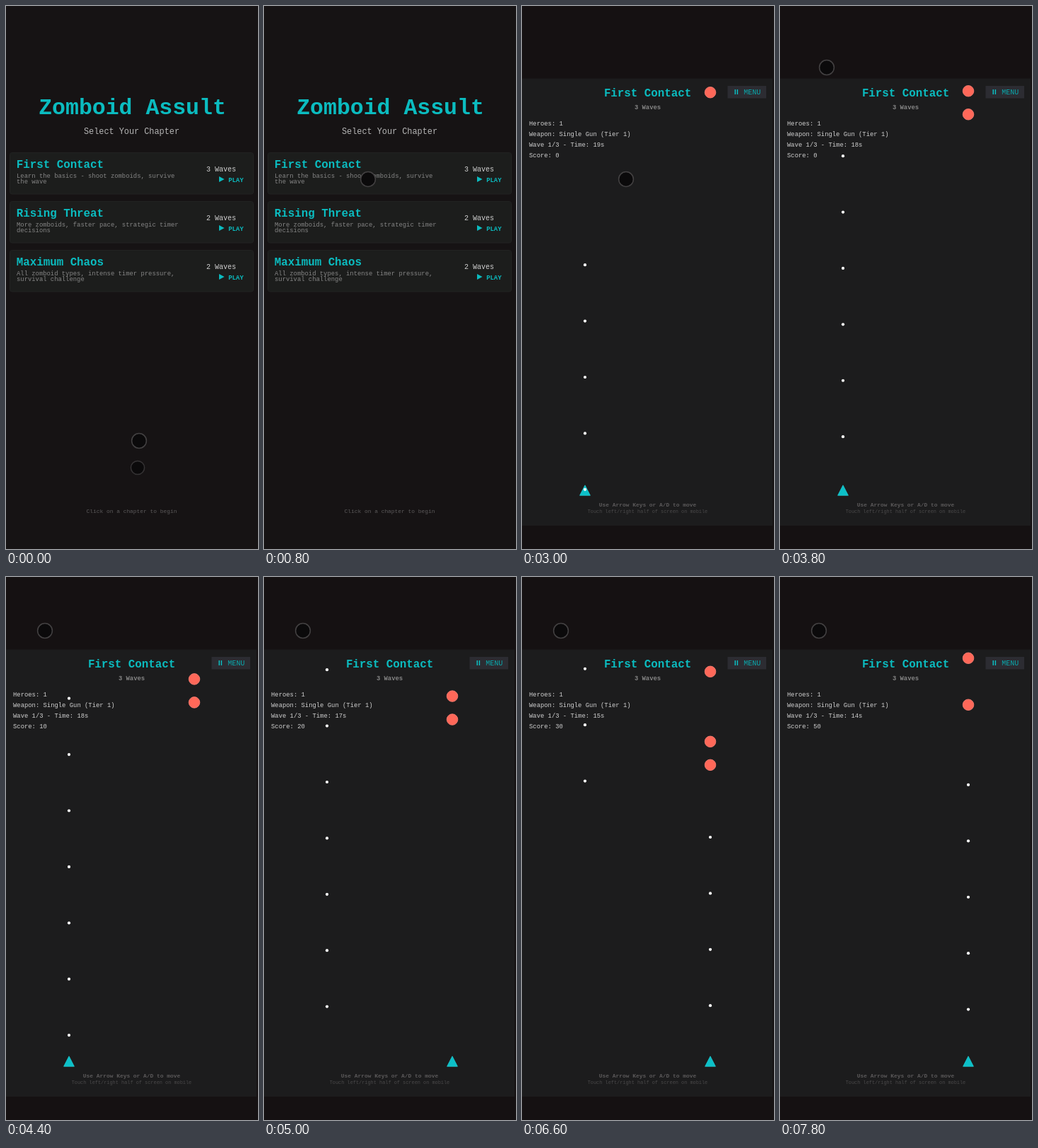
Animation, 356 px wide and 768 px high, one loop 8 s. Source, as an HTML page:

```html
<!DOCTYPE html>
<html lang="en">
<head>
<meta charset="utf-8">
<title>Zomboid Assult</title>
<style>
  html, body { margin: 0; height: 100%; overflow: hidden; background: #151112; }
  svg { display: block; width: 100vw; height: 100vh; }
  text { font-family: "Courier New", "Liberation Mono", monospace; font-size: 8.87px; fill: #d0d0d0; }
  .bold { font-weight: bold; }
  .teal { fill: #0bbcc0; }
  .mid { text-anchor: middle; }
  .end { text-anchor: end; }
  .dim { fill: #858585; }
  .faint { fill: #5c5a5b; }
  .big { font-size: 31.5px; }
  .head { font-size: 15.8px; }
  .label { font-size: 10px; }
  .note { font-size: 7.9px; }
  .card { fill: #1c1d1c; stroke: #222322; }
  .zomboid { fill: #ff6859; stroke: #ff8175; stroke-width: .8; }
  .bullet { fill: #fff; }
  .cursor { fill: #0b0a0b; stroke: #434142; stroke-width: 1.5; }
  #trail { stroke: #363435; }
</style>
</head>
<body>
<svg viewBox="0 0 356 768" preserveAspectRatio="none">
  <defs><clipPath id="field"><rect y="102" width="356" height="633"/></clipPath></defs>

  <g id="menu">
    <rect width="356" height="768" fill="#161314"/>
    <text class="mid bold teal big" x="178.5" y="153">Zomboid Assult</text>
    <text class="mid" x="177.5" y="180.5" style="font-size:11.85px;fill:#b5b5b5">Select Your Chapter</text>
    <g id="cards"></g>
    <text class="mid note faint" x="177.5" y="717">Click on a chapter to begin</text>
  </g>

  <g id="game">
    <rect width="356" height="768" fill="#151112"/>
    <rect y="102.5" width="354" height="632.5" fill="#1c1c1d"/>
    <text class="mid bold teal head" x="177.5" y="128">First Contact</text>
    <text class="mid bold dim" x="177.5" y="146">3 Waves</text>
    <rect x="290.5" y="113" width="54.5" height="17.5" fill="#2c2c32"/>
    <path class="teal" d="M300.5 118h1.5v7h-1.5zM303.6 118h1.5v7h-1.5z"/>
    <text class="label" x="313.3" y="125.3" style="fill:#0aa9ad">MENU</text>
    <text x="10" y="169">Heroes: 1</text>
    <text x="10" y="184">Weapon: Single Gun (Tier 1)</text>
    <text x="10" y="198.7" id="wave"></text>
    <text x="10" y="213.5" id="score"></text>
    <text class="mid bold note faint" x="177.5" y="707.5">Use Arrow Keys or A/D to move</text>
    <text class="mid" x="177.5" y="716.8" style="font-size:6.9px;fill:#4a494a">Touch left/right half of screen on mobile</text>
    <path id="hero" d="M0 677.8L7.4 692.2H-7.4z" fill="#0cc0c8" stroke="#1fcbd1" stroke-width=".8" stroke-linejoin="round"/>
    <g id="actors" clip-path="url(#field)"></g>
  </g>

  <circle id="trail" class="cursor" cx="186" cy="653" r="9.6"/>
  <circle id="cursor" class="cursor" r="10.4"/>
</svg>

<script>
const $ = id => document.getElementById(id);
const LOOP = 8000, STEP = 200, GAME_AT = 1600;
const LANES = [89, 266];
const START = 1394, FIRE_GAP = 400, BULLET_SPEED = 0.1985, MUZZLE = 685;
const SPAWN_AT = 2225, SPAWN_GAP = 825, WALK_SPEED = 0.04, SPAWN_Y = 91.2;
const LANE_CHANGE = 4700, HIT_GAP = 10;

// [time, game clock]: the game runs slightly unevenly
const CLOCK = [[1600, 1600], [3000, 3000], [3800, 3776], [5000, 4984], [6600, 6591], [7800, 7764]];
// [time, x, y]
const CURSOR = [[0, 188, 615], [400, 312, 240], [800, 147, 245], [3000, 147, 245],
  [3600, 66, 87], [3800, 66, 87], [4200, 55, 76]];

const CHAPTERS = [
  ["First Contact", 3, "Learn the basics - shoot zomboids, survive", "the wave"],
  ["Rising Threat", 2, "More zomboids, faster pace, strategic timer", "decisions"],
  ["Maximum Chaos", 2, "All zomboid types, intense timer pressure,", "survival challenge"],
];

$("cards").innerHTML = CHAPTERS.map(([name, waves, line1, line2], i) => `
  <g transform="translate(0 ${i * 69})">
    <rect class="card" x="5.5" y="207.5" width="344" height="58.5" rx="3"/>
    <text class="bold teal head" x="14.8" y="229">${name}</text>
    <text class="dim" x="15" y="243">${line1}</text>
    <text class="dim" x="15" y="251">${line2}</text>
    <text class="label" x="283" y="234.3">${waves} Waves</text>
    <path class="teal" d="M301 241l7.5 4-7.5 4z"/>
    <text class="bold teal end" x="335.5" y="248.6">PLAY</text>
  </g>`).join("");

const firedAt = n => START + n * FIRE_GAP;

// Each zomboid: lane and the bullet that stops it, if any
const zomboids = [[1, 9], [1, 10], [0, 0], [0, 1], [1], [0, 5], [1]].map(([lane, bullet], i) => {
  const born = SPAWN_AT + i * SPAWN_GAP;
  const meet = (MUZZLE - HIT_GAP - SPAWN_Y + BULLET_SPEED * firedAt(bullet) + WALK_SPEED * born)
    / (BULLET_SPEED + WALK_SPEED);
  return { lane, bullet, born, dies: bullet === undefined ? Infinity : Math.max(born, meet) };
});

// Value of each column at time t, linear between keys
function track(keys, t) {
  const i = keys.findIndex(k => k[0] > t);
  if (i < 0) {
    return keys[keys.length - 1].slice(1);
  }
  const a = keys[Math.max(i - 1, 0)], b = keys[i];
  const p = a === b ? 0 : (t - a[0]) / (b[0] - a[0]);
  return a.slice(1).map((v, j) => v + (b[j + 1] - v) * p);
}

const laneX = g => LANES[g < LANE_CHANGE ? 0 : 1];
const dot = (kind, x, y, r) => `<circle class="${kind}" cx="${x}" cy="${y.toFixed(2)}" r="${r}"/>`;

function drawGame(g) {
  const dead = zomboids.filter(z => z.dies <= g);
  const spent = new Set(dead.map(z => z.bullet));
  let shapes = "";
  for (const z of zomboids) {
    if (z.born <= g && g < z.dies) {
      shapes += dot("zomboid", LANES[z.lane], SPAWN_Y + WALK_SPEED * (g - z.born), 7.8);
    }
  }
  for (let n = 0; firedAt(n) <= g; n++) {
    const y = MUZZLE - BULLET_SPEED * (g - firedAt(n));
    if (y > 98 && !spent.has(n)) {
      shapes += dot("bullet", laneX(firedAt(n)), y, 2.1);
    }
  }
  $("actors").innerHTML = shapes;
  $("hero").setAttribute("transform", `translate(${laneX(g)} 0)`);
  $("wave").textContent = `Wave 1/3 - Time: ${20 - Math.floor((g - START) / 1000)}s`;
  $("score").textContent = `Score: ${dead.length * 10}`;
}

function draw(t) {
  const playing = t >= GAME_AT;
  $("menu").style.display = playing ? "none" : "";
  $("game").style.display = playing ? "" : "none";
  $("trail").style.display = t < STEP ? "" : "none";
  const [x, y] = track(CURSOR, t);
  $("cursor").setAttribute("cx", x);
  $("cursor").setAttribute("cy", y);
  if (playing) {
    drawGame(track(CLOCK, t)[0]);
  }
}

// The picture is held for one step at a time
let shown = -1;
const origin = performance.now();
function tick() {
  const t = Math.floor((performance.now() - origin) % LOOP / STEP) * STEP;
  if (t !== shown) {
    draw(shown = t);
  }
  requestAnimationFrame(tick);
}
tick();
</script>
</body>
</html>
```
